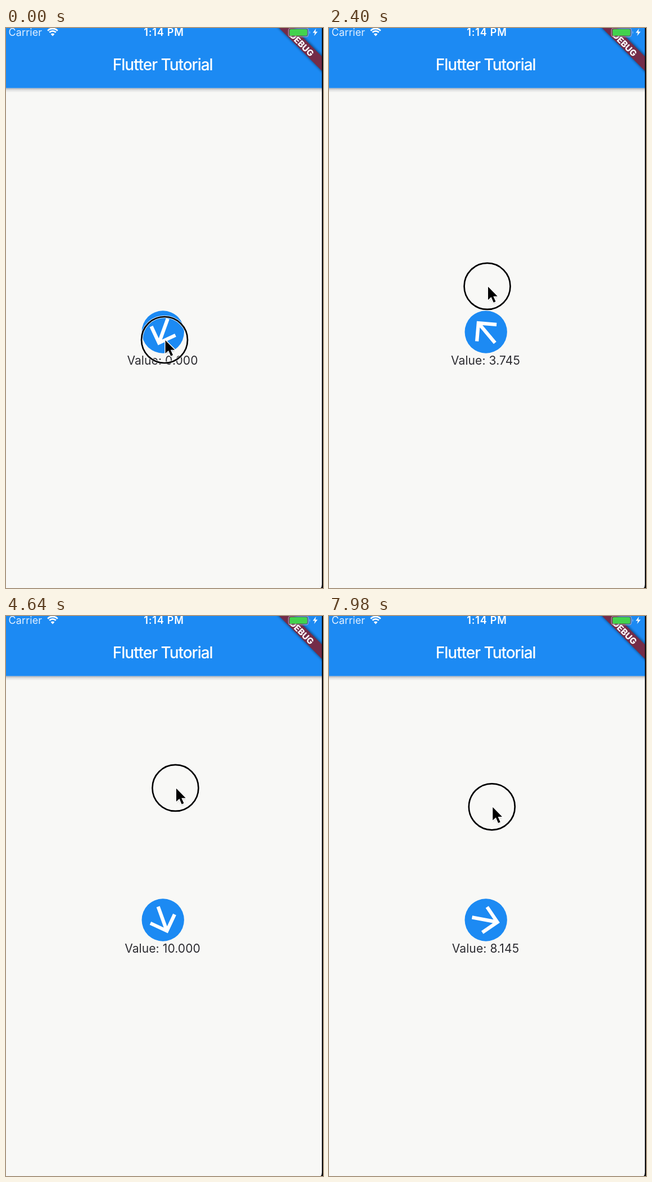
Recreate the animation shown at these times as an HTML page. Size 564 px wide and 993 px high, loop 8 s.

```html
<!DOCTYPE html>
<html lang="en">
<head>
<meta charset="utf-8">
<title>Rotary knob demo</title>
<style>
  html, body { margin: 0; width: 100%; height: 100%; overflow: hidden; background: #f8f8f6; }
  svg { display: block; width: 100vw; height: 100vh; }
  text { font-family: Inter, Roboto, "Liberation Sans", sans-serif; text-anchor: middle; }
  .status { font-size: 18px; fill: #e3f0ff; }
  .title { font-size: 28px; font-weight: 500; letter-spacing: -1.02px; fill: #fff; }
  .value { font-size: 21px; letter-spacing: .1px; fill: #2b2b30; }
  .debug { font-size: 15.3px; font-weight: 800; fill: #fff; }
  .wifi { fill: none; stroke: #fff; stroke-width: 2.8; }
</style>
</head>
<body>
<svg viewBox="0 0 564 993" preserveAspectRatio="none">
  <defs>
    <linearGradient id="shade" x1="0" y1="0" x2="0" y2="1">
      <stop offset="0" stop-color="#223" stop-opacity=".36"/>
      <stop offset=".4" stop-color="#223" stop-opacity=".12"/>
      <stop offset="1" stop-color="#223" stop-opacity="0"/>
    </linearGradient>
    <filter id="blur" x="-30%" y="-30%" width="160%" height="160%">
      <feGaussianBlur stdDeviation="2"/>
    </filter>
    <clipPath id="bar"><rect width="562" height="107"/></clipPath>
  </defs>

  <rect width="564" height="993" fill="#f8f8f6"/>
  <rect y="106.5" width="562" height="8" fill="url(#shade)"/>
  <rect width="562" height="106.5" fill="#1c8af3"/>
  <text class="title" x="278.7" y="74.6">Flutter Tutorial</text>

  <g clip-path="url(#bar)">
    <path d="M477-8L571 86V57L506-8Z" fill="#000" opacity=".45" filter="url(#blur)"/>
    <path d="M478-8L572 86V60.5L503.5-8Z" fill="#742c48"/>
    <text class="debug" transform="translate(526.2 29) rotate(45)" y="5.5">DEBUG</text>
  </g>

  <text class="status" x="4.6" y="14" style="text-anchor:start;letter-spacing:.1px">Carrier</text>
  <text class="status" x="281" y="14" style="font-weight:600;letter-spacing:.8px;fill:#fff">1:14 PM</text>
  <path class="wifi" d="M74.2 4.7A12.5 12.5 0 0 1 91.8 4.7M77.3 7.8A8 8 0 0 1 88.7 7.8"/>
  <path d="M83 14.5L79.6 10.8A4.8 4.8 0 0 1 86.4 10.8Z" fill="#fff"/>
  <rect x="502.5" y=".2" width="35.5" height="15.4" rx="4" fill="#742c48" fill-opacity=".5" stroke="#b9c4d8" stroke-opacity=".7" stroke-width="1.3"/>
  <rect x="504.5" y="2" width="31.5" height="11.8" rx="2.4" fill="#42d24d"/>
  <path d="M540 5.2Q542.4 7.8 540 10.4Z" fill="#c4d4ec" opacity=".7"/>
  <path d="M551.5 1L545.8 8.6H549.6L548.2 14L554.4 6.6H550.4Z" fill="#fff"/>

  <circle cx="279.2" cy="539" r="37.7" fill="#1c8af3"/>
  <path id="arrow" fill="#fff" d="M4 12l1.41 1.41L11 7.83V20h2V7.83l5.58 5.59L20 12l-8-8-8 8z"/>
  <text id="value" class="value" x="278.5" y="597">Value: 0.000</text>

  <path d="M562 0H564V993H560Q562 991 562 987Z" fill="#0a0a0c"/>

  <g id="pointer">
    <circle r="41" fill="none" stroke="#fff" stroke-width="4.6" stroke-opacity=".8"/>
    <circle r="41" fill="none" stroke="#000" stroke-width="2.7"/>
    <g transform="translate(1.5 .8) scale(.93)">
      <path d="M0 2V27L6 21.5L10.5 32L14.5 30.3L10 20.2H18Z" fill="#000" opacity=".3" filter="url(#blur)"/>
      <path d="M0 0V25L6 19.5L10.5 30L14.5 28.3L10 18.2H18Z" fill="#000" stroke="#fff" stroke-width="3" paint-order="stroke"/>
    </g>
  </g>
</svg>
<script>
  const LOOP = 8000, STEP = 0.035, MAX = 10;
  // time, x, y
  const path = [
    [0, 282, 553], [840, 280.5, 556.5], [1560, 279.3, 507.8], [3340, 284, 402.3],
    [4080, 295.5, 343], [4500, 300, 314], [4900, 304, 288.3], [6700, 304, 288.3],
    [6880, 303, 293.2], [7980, 289.8, 338.3]
  ];
  // time, knob value
  const dial = [
    [0, 0], [950, 0], [1560, 1.68], [3340, 6.02], [4080, 8.68],
    [4500, 10], [6840, 10], [6880, 9.965], [7980, 8.145]
  ];
  const [arrow, value, pointer] = ['arrow', 'value', 'pointer'].map(id => document.getElementById(id));

  function at(keys, t) {
    const i = keys.findIndex(k => k[0] > t);
    if (i < 0) return keys[keys.length - 1].slice(1);
    const a = keys[i - 1], b = keys[i], p = (t - a[0]) / (b[0] - a[0]);
    return a.slice(1).map((v, n) => v + (b[n + 1] - v) * p);
  }

  const snap = v => Math.round(v / STEP) * STEP;

  function draw(t) {
    const [x, y] = at(path, t), [raw] = at(dial, t);
    // steps count up from zero, then back down from the maximum
    const v = t < 4500 ? Math.min(MAX, snap(raw)) : MAX - snap(MAX - raw);
    pointer.setAttribute('transform', `translate(${x} ${y})`);
    arrow.setAttribute('transform', `translate(279.2 539) rotate(${200 + v * 32}) scale(3.14) translate(-12 -12)`);
    value.textContent = 'Value: ' + v.toFixed(3);
  }

  const start = performance.now();
  function tick() {
    draw((performance.now() - start) % LOOP);
    requestAnimationFrame(tick);
  }
  tick();
</script>
</body>
</html>
```
